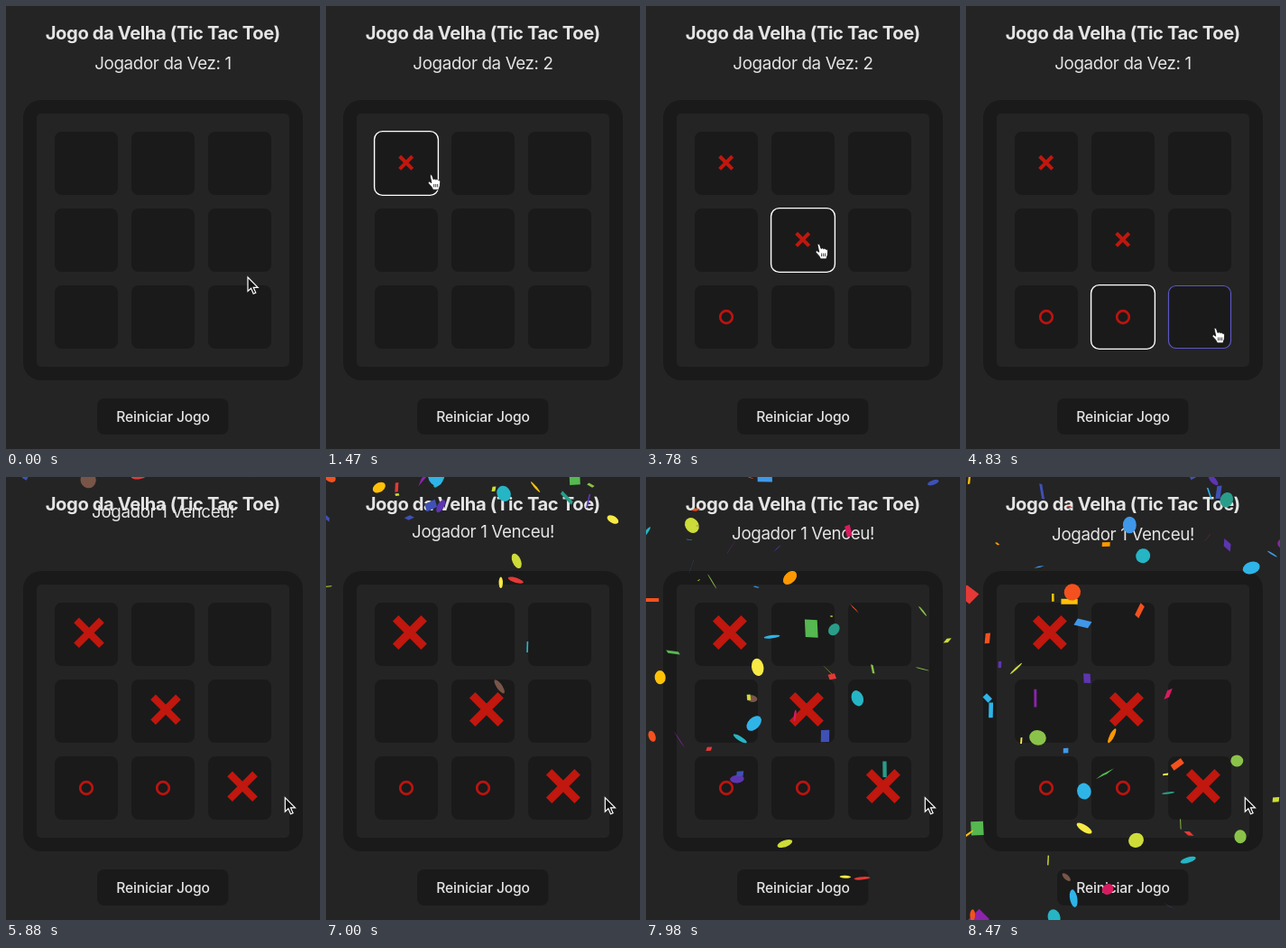
These frames come from a looping animation (348 px wide and 490 px high, 8540 ms). An HTML page with a canvas:

```html
<!DOCTYPE html>
<html lang="pt">
<head>
<meta charset="utf-8">
<style>
  html, body { margin: 0; width: 100%; height: 100%; overflow: hidden; background: #242424; }
  svg, canvas { position: absolute; left: 0; top: 0; width: 348px; height: 490px; }
  text { font-family: Inter, "Open Sans", sans-serif; fill: #e4e4e4; text-anchor: middle; letter-spacing: -.02em; }
</style>
</head>
<body>
<svg viewBox="0 0 348 490">
  <rect x="19" y="104" width="310" height="310" rx="20" fill="#1a1a1a"/>
  <rect x="34" y="119" width="280" height="280" rx="5" fill="#242424"/>
  <g id="board"></g>
  <rect x="101" y="434" width="145.5" height="40" rx="8" fill="#1a1a1a"/>
  <text x="174" y="460" font-size="15.6" font-weight="500" style="letter-spacing:-.01em">Reiniciar Jogo</text>
  <text x="173.7" y="37" font-size="20.2" font-weight="700">Jogo da Velha (Tic Tac Toe)</text>
  <text id="status" x="174" y="70" font-size="18.8"></text>
</svg>
<canvas width="348" height="490"></canvas>
<svg viewBox="0 0 348 490">
  <path id="arrow" d="M0 0V15.5L3.6 12.2L6.2 18.2L8.8 17.1L6.2 11.3H11.2Z" fill="#111" stroke="#fff" stroke-width="1.2"/>
  <g id="hand" stroke="#111" stroke-width=".8" stroke-linejoin="round">
    <path d="M1.2 1.5Q1.6 -.8 3.4 .7L5 5.4Q6.6 4 7.6 5.6Q9.3 4.3 10.2 6.2Q12.4 5.6 12.6 8L12.2 12.5L10.8 16.8H4.6L2.6 13.2L-.8 9.5Q-1.4 7.6 .6 7.8L2.8 9.2Z" fill="#fff"/>
    <path d="M5.6 10.5V14M7.6 10.5V14M9.6 10.5V14" fill="none"/>
  </g>
</svg>
<script>
const LOOP = 8540, WIN = 5600, PIECES = 145;
const $ = s => document.querySelector(s);
const board = $('#board'), status = $('#status'), arrow = $('#arrow'), hand = $('#hand');
const ctx = $('canvas').getContext('2d');

function set(el, attrs) {
  for (const k in attrs) el.setAttribute(k, attrs[k]);
}
function add(name, attrs) {
  const el = document.createElementNS('http://www.w3.org/2000/svg', name);
  set(el, attrs);
  return board.appendChild(el);
}
const show = (el, on) => { el.style.display = on ? '' : 'none'; };
const box = (x, y, size, rx, attrs) => add('rect', { x, y, width: size, height: size, rx, fill: 'none', ...attrs });

const cells = Array.from({ length: 9 }, (_, i) => {
  const x = 54 + i % 3 * 85, y = 139 + Math.floor(i / 3) * 85;
  box(x, y, 70, 8, { fill: '#1a1a1a' });
  return {
    x, y,
    hover: box(x + .5, y + .5, 69, 8, { stroke: '#5c58c4', 'stroke-width': 1.2 }),
    focus: box(x - .4, y - .4, 70.8, 9, { stroke: '#fff', 'stroke-width': 1.4 })
  };
});

// Players alternate X and O; dy is where the pointer rests in the cell
const moves = [
  { cell: 0, arrive: 1120, press: 1190, dy: 2 },
  { cell: 6, arrive: 2870, press: 3150, dy: -25 },
  { cell: 4, arrive: 3570, press: 3640, dy: 4 },
  { cell: 7, arrive: 4270, press: 4340, dy: 4 },
  { cell: 8, arrive: 4830, press: 5460, dy: 12 }
];

const marks = moves.map(({ cell }, i) => i % 2
  ? add('circle', { cx: cells[cell].x + 35, cy: cells[cell].y + 35, r: 6.8, fill: 'none', stroke: '#bd130f', 'stroke-width': 2.7 })
  : add('path', { d: 'M-.415-.415L.415.415M.415-.415L-.415.415', stroke: '#c0170e', 'stroke-width': .24 }));

// Pointer stops: time, x, y
const trail = [
  [0, 268, 300], [420, 22, 236], [560, 22, 236], [630, -25, 205], [780, -25, 205], [840, 20, 195],
  [2030, 200, 275], [5700, 309.3, 354.6]
];
for (const { cell, arrive, press, dy } of moves) {
  const x = cells[cell].x + 50, y = cells[cell].y + 35 + dy;
  trail.push([arrive, x, y], [press + 140, x, y]);
}
trail.sort((a, b) => a[0] - b[0]);

function pointer(t) {
  const i = trail.findIndex(p => p[0] > t);
  if (i < 0) return trail[trail.length - 1].slice(1);
  const [t0, x0, y0] = trail[i - 1], [t1, x1, y1] = trail[i];
  const u = (t - t0) / (t1 - t0), e = u * u * (3 - 2 * u);
  return [x0 + (x1 - x0) * e, y0 + (y1 - y0) * e];
}

let seed = 11;
const rnd = (a, b) => {
  seed = (seed * 16807) % 2147483647;
  return a + (b - a) * seed / 2147483647;
};
const colors = ['#e53935', '#d81b60', '#8e24aa', '#5e35b1', '#3f51b5', '#4098e8', '#2fb4e8', '#26b5c4', '#2a9d8a',
  '#56b850', '#8bc34a', '#cddc39', '#f7ea45', '#ffc107', '#ff9800', '#f4511e', '#795548'];
const confetti = Array.from({ length: PIECES }, (_, i) => ({
  born: WIN + 1200 * i / PIECES,
  x: rnd(0, 348), vx: rnd(-4, 4), vy: rnd(-10, 0),
  w: rnd(5, 20), h: rnd(5, 20), r: rnd(5, 10),
  angle: rnd(0, 6.283), spin: rnd(-.2, .2), flip: rnd(0, 4),
  shape: Math.floor(rnd(0, 3)), color: colors[Math.floor(rnd(0, colors.length))]
}));

// Gravity with air drag, in steps of 1/60 s
function drawConfetti(t) {
  ctx.clearRect(0, 0, 348, 490);
  for (const p of confetti) {
    const n = (t - p.born) * .06;
    if (n < 0) continue;
    const drag = 100 * (1 - Math.exp(-n / 100));
    const angle = p.angle + p.spin * n;
    ctx.save();
    ctx.translate(p.x + p.vx * drag, 10 * n + (p.vy - 10) * drag);
    ctx.rotate(angle);
    ctx.scale(1, Math.abs((p.flip + n * .1) % 4 - 2) - 1);
    ctx.rotate(angle);
    ctx.fillStyle = p.color;
    ctx.beginPath();
    if (p.shape === 0) ctx.arc(0, 0, p.r, 0, 7);
    else if (p.shape === 1) ctx.rect(-p.w / 2, -p.h / 2, p.w, p.h);
    else ctx.rect(-p.w / 6, -p.h / 2, p.w / 3, p.h);
    ctx.fill();
    ctx.restore();
  }
}

function draw(t) {
  const won = t >= WIN;
  const decay = tau => Math.exp(-Math.max(0, t - WIN) / tau);
  const [x, y] = pointer(t);
  const pressed = moves.filter(m => t >= m.press);
  const placed = moves.filter(m => t >= m.press + 70).length;
  const focus = won || !pressed.length ? -1 : pressed[pressed.length - 1].cell;
  let over = false;

  cells.forEach((c, i) => {
    const inside = !won && x >= c.x && x <= c.x + 70 && y >= c.y && y <= c.y + 70;
    over = over || inside;
    show(c.hover, inside && i !== focus);
    show(c.focus, i === focus);
  });

  // The winning line grows from its left edge
  const grow = 21 * (1 - decay(180));
  marks.forEach((m, i) => {
    show(m, i < placed);
    if (i % 2) return;
    const c = cells[moves[i].cell];
    set(m, { transform: `translate(${c.x + 34.7 + grow * .2} ${c.y + 34.3 - grow * .06}) scale(${17 + grow})` });
  });

  status.textContent = won ? 'Jogador 1 Venceu!' : 'Jogador da Vez: ' + (Math.min(placed, 4) % 2 + 1);
  set(status, { y: won ? 70 - 41 * decay(550) : 70 });

  show(hand, over);
  show(arrow, !over);
  set(over ? hand : arrow, { transform: `translate(${x} ${y})` });
  drawConfetti(t);
}

const start = performance.now();
function tick() {
  draw((performance.now() - start) % LOOP);
  requestAnimationFrame(tick);
}
tick();
</script>
</body>
</html>
```
